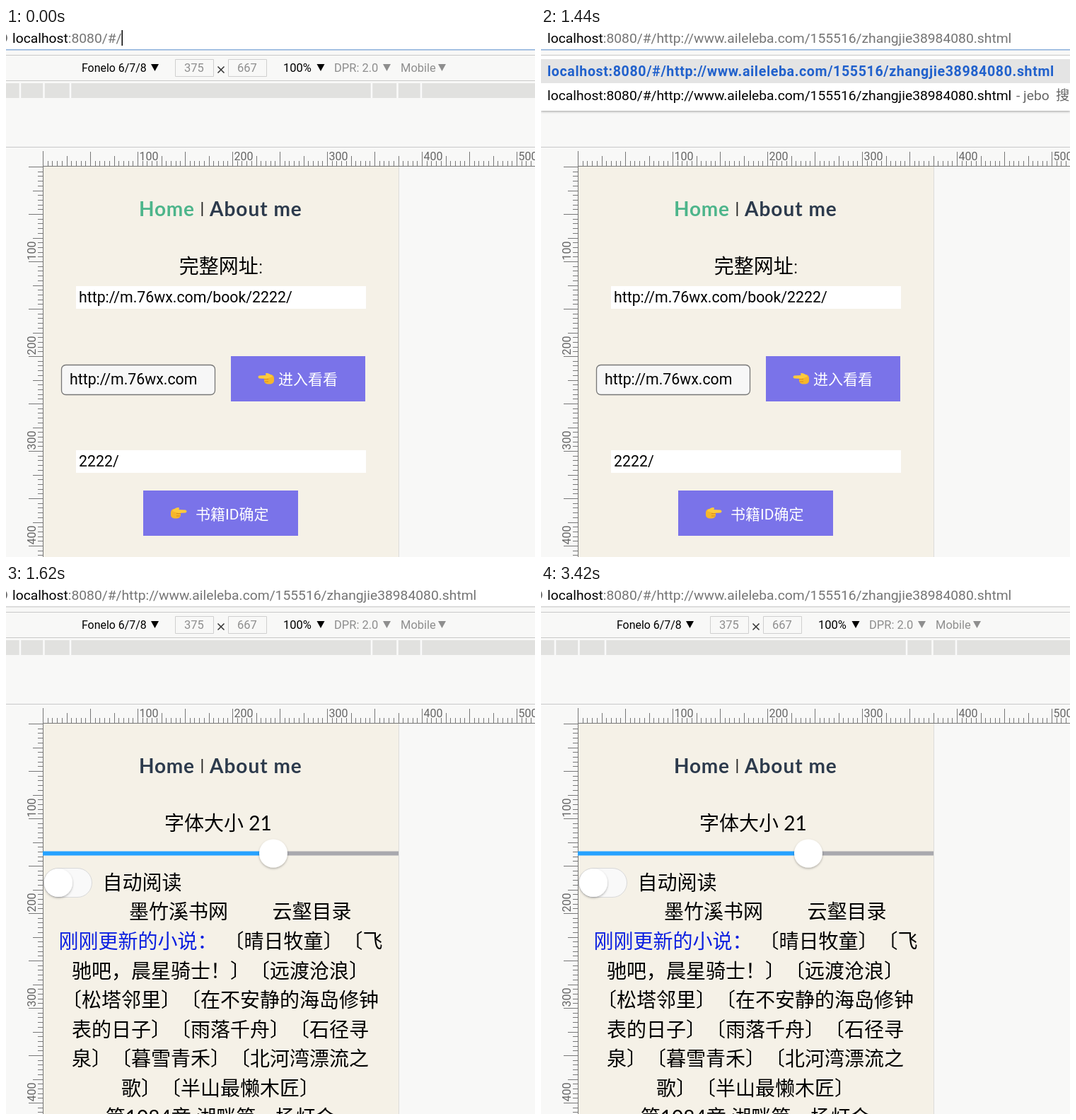
Animation, 748 px wide and 748 px high, one loop 3480 ms. Source, as an HTML page:

```html
<!DOCTYPE html>
<html lang="zh-CN">
<head>
<meta charset="utf-8">
<style>
html, body { margin: 0; height: 100%; overflow: hidden; background: #f8f8f7; }
svg { display: block; width: 100vw; height: 100vh; }
text { white-space: pre; text-spacing-trim: space-all; }
.ui { font-family: Roboto, "Noto Sans CJK SC", sans-serif; }
.page { font: 350 28px Lato, "Noto Sans CJK SC", sans-serif; }
.latin { font-weight: 400; }
.mid { text-anchor: middle; }
.nav { font: bold 28px Lato, sans-serif; letter-spacing: .8px; fill: #2c3a4c; }
.button { font: 350 21px Roboto, "Noto Sans CJK SC", sans-serif; fill: #fff; }
.input { font-size: 21.3px; }
.url { font-size: 19.27px; }
.tool { font-size: 16.5px; }
</style>
</head>
<body>
<svg viewBox="0 0 748 748">
  <defs>
    <g id="hand">
      <rect x="1" y="3" width="14" height="13.5" rx="5" fill="#f6b62c"/>
      <path d="M3 6Q7 1 12 1Q14 2 12 4L22 4.5Q25 6.500 22 8.500L12 9Z" fill="#fdca3d"/>
      <path d="M9 9.500h6M9 13h5" stroke="#d98c1c" stroke-width="1.100"/>
    </g>
    <path id="arrow" d="M-5.500-5h11L0 5z"/>
    <filter id="soft" x="-30%" y="-30%" width="160%" height="170%">
      <feDropShadow dx="0" dy="1.500" stdDeviation="1.800" flood-opacity=".3"/>
    </filter>
  </defs>

  <rect width="748" height="748" fill="#f8f8f7"/>
  <rect width="748" height="30" fill="#fff"/>
  <rect id="underline" y="30" width="748" height="1.500"/>
  <path d="M0 38.500H748M0 74.500H748M0 168.500H748" stroke="#c9c9c9"/>
  <g id="tools" class="ui tool">
    <text x="107" y="62" font-size="15.900">Fonelo 6/7/8</text>
    <text x="392" y="62">100%</text>
    <g fill="#8e8e8e">
      <text x="464" y="62">DPR: 2.0</text><text x="558" y="62">Mobile</text>
      <text x="252" y="62">375</text><text x="327" y="62">667</text>
      <use href="#arrow" x="538.500" y="56"/><use href="#arrow" x="616.500" y="56"/>
    </g>
    <use href="#arrow" x="210.500" y="56"/><use href="#arrow" x="445" y="56"/>
    <path d="M239.500 44.500h54v24h-54zM314.500 44.500h54v24h-54z" fill="none" stroke="#cfcfcf"/>
    <path d="M299.500 54.500l9 9m0-9l-9 9" stroke="#333" stroke-width="1.500"/>
    <rect y="78" width="748" height="21" fill="#e1e1df"/>
    <path d="M20 78v21M53.500 78v21M91 78v21M517 78v21M553.500 78v21M587 78v21" stroke="#fafafa" stroke-width="2.500"/>
  </g>

  <rect x="53" y="196" width="502" height="552" fill="#f5f1e7"/>
  <path d="M555.500 196V748" stroke="#dcdcda"/>
  <path d="M52 195.500H748M52.500 174V748" stroke="#777"/>
  <path id="ticks" stroke="#777"/>
  <g id="labels" class="ui" font-size="16" fill="#666"></g>

  <text id="home" class="nav" x="188" y="266">Home</text>
  <rect x="276.500" y="246" width="1.800" height="20" fill="#222"/>
  <text class="nav" x="288" y="266" style="letter-spacing:1px">About me</text>

  <g id="form">
    <text class="page mid" x="304" y="347">完整网址:</text>
    <path d="M99 365h410v32H99zM99 597h410v32H99z" fill="#fff"/>
    <rect x="78.500" y="476.500" width="217" height="42" rx="6" fill="#f7f7f7" stroke="#777" stroke-width="1.300"/>
    <path d="M318 464h190v64H318zM194 654h219v64H194z" fill="#7a73e9"/>
    <g class="ui input">
      <text x="103" y="388">http://m.76wx.com/book/2222/</text>
      <text x="90" y="504">http://m.76wx.com</text>
      <text x="103" y="620">2222/</text>
    </g>
    <use href="#hand" transform="translate(380 487) scale(-1 1)"/>
    <use href="#hand" transform="translate(232 677)"/>
    <text class="button" x="385" y="504">进入看看</text>
    <text class="button" x="268" y="695">书籍<tspan class="latin">ID</tspan>确定</text>
  </g>

  <g id="loading" class="page">
    <text class="mid" x="300" y="347">请求</text>
    <g class="latin">
      <text x="97" y="389" style="letter-spacing:.3px">source: http://www.aileleba.com</text>
      <text x="94" y="430">/155516/zhangjie38984080.shtml</text>
    </g>
    <g id="dots" fill="#26a2ff"></g>
    <g class="ui latin" font-size="27.200">
      <text x="147" y="713" fill="#f0a818">@meadowf–kit</text>
      <text x="340" y="713">2018.5.16</text>
    </g>
  </g>

  <g id="reader" class="page">
    <text x="224" y="347">字体大小<tspan class="latin"> 21</tspan></text>
    <rect x="52" y="376.500" width="326" height="6" fill="#26a2ff"/>
    <rect x="378" y="376.500" width="177" height="6" fill="#a9a9ae"/>
    <circle cx="378" cy="379.500" r="20" fill="#fff" filter="url(#soft)"/>
    <rect x="53.500" y="400.500" width="68" height="41" rx="20.500" fill="#f9f9f9" stroke="#d9d9d9"/>
    <circle cx="74" cy="421" r="20" fill="#fff" filter="url(#soft)"/>
    <text x="136.500" y="431">自动阅读</text>
    <text x="174" y="472">墨竹溪书网</text>
    <text x="376.500" y="472">云壑目录</text>
    <text x="74.500" y="514" fill="#0b1fe0">刚刚更新的小说：</text>
    <text x="308.500" y="514">〔晴日牧童〕〔飞</text>
  </g>

  <g id="address" class="ui url">
    <circle id="info" cx="-6" cy="14" r="7" fill="none" stroke="#666" stroke-width="1.800"/>
    <text x="9" y="20.500">localhost<tspan id="path" fill="#757575"></tspan></text>
    <rect id="caret" y="3" width="1.500" height="22"/>
  </g>
  <g id="suggest" class="ui url">
    <rect y="39" width="748" height="78" fill="#fff" filter="url(#soft)"/>
    <path d="M0 38.500H748" stroke="#c9c9c9"/>
    <rect y="44" width="748" height="34" fill="#e4e4e4"/>
    <text id="best" x="9" y="68" fill="#2161cc" style="font:bold 19.600px Roboto,sans-serif;letter-spacing:.62px"></text>
    <text x="9" y="102"><tspan id="second"></tspan><tspan x="672" fill="#666">- jebo</tspan><tspan x="728" fill="#666">搜索</tspan></text>
  </g>
  <path id="cursor" d="M555.500 190v18.500l4.300-4 3.200 7.500 3.200-1.400-3.200-7.200h6z" stroke="#fff"/>
</svg>
<script>
const $ = id => document.getElementById(id);
const show = (id, on) => $(id).style.display = on ? '' : 'none';

const LOOP = 3480, PASTE = 660, ENTER = 1500, LOADED = 1620;
const BLINK = 500, UNIT = 1.34;
const pasted = '/#/http://www.aileleba.com/155516/zhangjie38984080.shtml';
$('best').textContent = $('second').textContent = 'localhost:8080' + pasted;

// Rulers: a tick every 5 units, longer at 25 and 50
let ticks = '', labels = '';
for (let n = 0; n <= 520; n += 5) {
  const len = n % 50 ? (n % 25 ? 7 : 14) : 20;
  const x = Math.round(53 + n * UNIT) - .5, y = Math.round(196 + n * UNIT) + .5;
  ticks += `M${x} 195v${-len}M52 ${y}h${-len}`;
  if (n && n % 100 === 0) {
    labels += `<text x="${x + 2}" y="187">${n}</text>
      <text transform="translate(42 ${y - 2}) rotate(-90)">${n}</text>`;
  }
}
$('ticks').setAttribute('d', ticks);
$('labels').innerHTML = labels;

const lines = ['驰吧，晨星骑士！〕〔远渡沧浪〕', '〔松塔邻里〕〔在不安静的海岛修钟',
  '表的日子〕〔雨落千舟〕〔石径寻', '泉〕〔暮雪青禾〕〔北河湾漂流之',
  '歌〕〔半山最懒木匠〕', '第<tspan class="latin">1084</tspan>章 湖畔第一场灯会'];
$('reader').insertAdjacentHTML('beforeend', lines.map((line, i) =>
  `<text class="mid" x="303" y="${555.5 + i * 41.5}">${line}</text>`).join(''));

$('dots').innerHTML = [269, 304, 338].map(x => `<circle cx="${x}" cy="458"/>`).join('');

function draw() {
  const t = performance.now() % LOOP;
  const typed = t >= PASTE, entered = t >= ENTER, loaded = t >= LOADED;
  show('form', !entered);
  show('loading', entered && !loaded);
  show('reader', loaded);
  show('suggest', typed && !entered);
  show('info', !typed || entered);
  $('path').textContent = ':8080' + (typed ? pasted : '/#/');
  $('home').style.fill = entered ? '#2c3a4c' : '#4db58b';
  $('underline').style.fill = entered ? '#d4d4d4' : '#8cb0dc';

  const sinceKey = typed ? t - PASTE : t + 200;
  show('caret', !entered && sinceKey % (2 * BLINK) < BLINK);
  $('caret').setAttribute('x', typed ? 665 : 163.5);

  [...$('dots').children].forEach((dot, i) => {
    const phase = (t - ENTER + 340 - i * 170) / 400;
    dot.setAttribute('r', Math.max(.5, 11 * Math.sin(Math.PI / 2 * Math.min(1, phase))));
  });
  show('cursor', t >= 2280 && t < 2700);
  requestAnimationFrame(draw);
}
draw();
</script>
</body>
</html>
```
